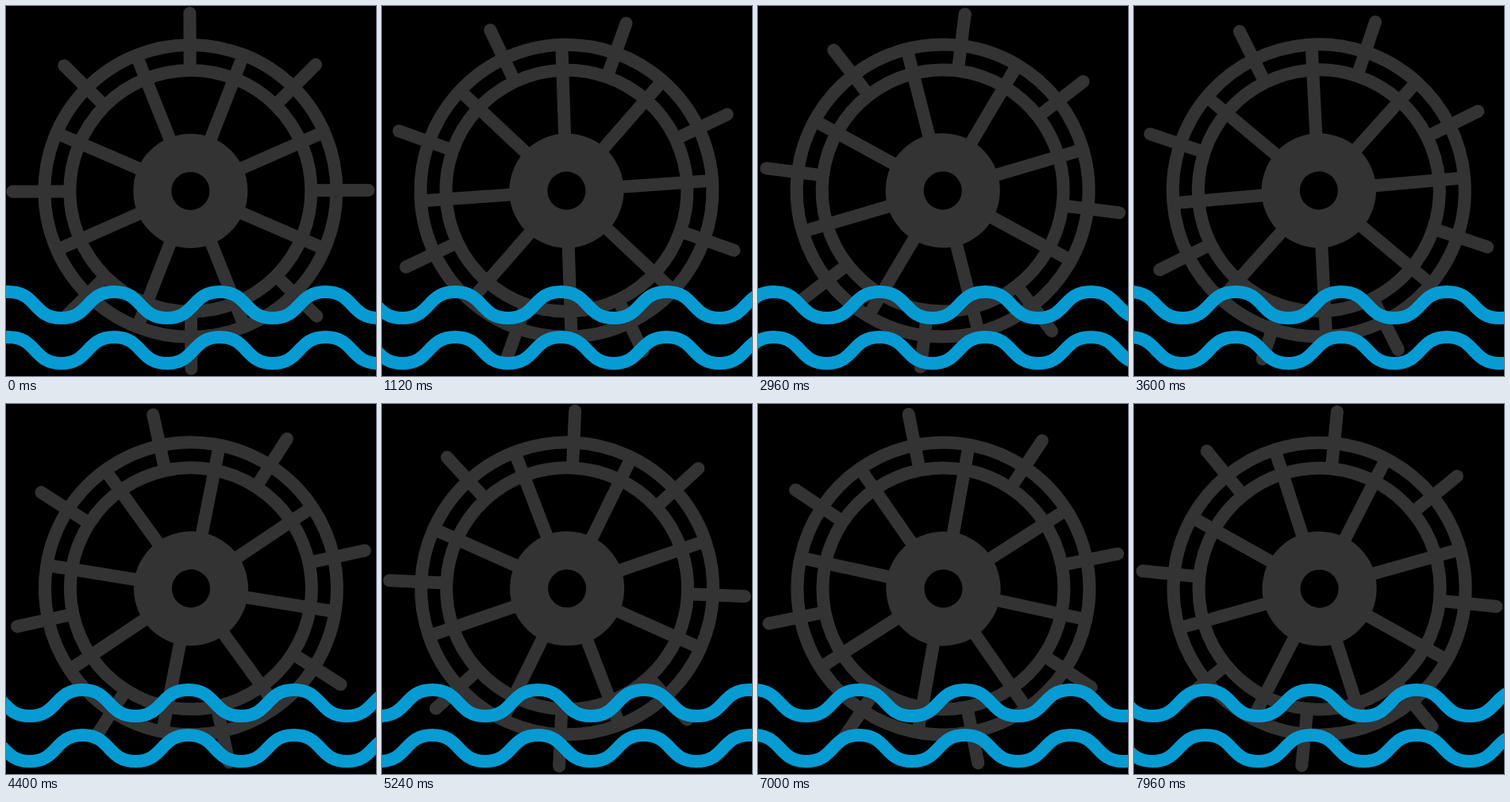
An HTML page for the animation above (8 s loop, 466 by 466 pixels).

```html
<!DOCTYPE html>
<html lang="en">
<head>
<meta charset="utf-8">
<title>Ship's wheel on the waves</title>
<style>
  html, body { margin: 0; width: 100%; height: 100%; overflow: hidden; background: #000; }
  svg { display: block; width: 100%; height: 100%; }
</style>
</head>
<body>
<svg viewBox="0 0 466 466" fill="none" stroke-width="16">
  <g id="wheel" stroke="#333">
    <circle r="184"/>
    <circle r="152"/>
    <circle r="48" stroke-width="48"/>
    <path id="spokes"/>
    <path id="handles"/>
    <g id="caps" fill="#333" stroke="none"></g>
  </g>
  <g id="waves" stroke="#069bd3">
    <path id="upper"/>
    <path id="lower"/>
  </g>
</svg>
<script>
  const LOOP = 8000;          // ms shown before the cut
  const TURN = 20330;         // ms for one full turn of the wheel
  const START_ANGLE = -0.25;
  const WAVELENGTH = 466 / 3.5;
  const WAVES_PER_TURN = 6;
  const CREST_X = 136.3;      // a crest at time 0
  const WAVE_HEIGHT = 33;
  const HANDLE = 36;          // length of the curve handles at crest and trough

  const byId = id => document.getElementById(id);
  const wheel = byId('wheel');
  const waves = byId('waves');

  function polar(r, deg) {
    const a = deg * Math.PI / 180;
    return [r * Math.sin(a), -r * Math.cos(a)].map(v => v.toFixed(2));
  }

  function rays(from, to, angles) {
    return angles.map(deg => `M${polar(from, deg)}L${polar(to, deg)}`).join('');
  }

  function wavePath(y) {
    const half = WAVELENGTH / 2;
    let x = CREST_X - 2 * WAVELENGTH;
    let d = `M${x} ${y}`;
    for (let i = 0; i < 14; i++) {
      const y0 = i % 2 ? y + WAVE_HEIGHT : y;
      const y1 = i % 2 ? y : y + WAVE_HEIGHT;
      d += `C${x + HANDLE} ${y0} ${x + half - HANDLE} ${y1} ${x + half} ${y1}`;
      x += half;
    }
    return d;
  }

  const handleAngles = Array.from({ length: 8 }, (_, i) => i * 45);
  // Spokes mirror left to right and top to bottom.
  const spokeAngles = [21.5, 66.4].flatMap(a => [a, -a, 180 - a, 180 + a]);

  byId('spokes').setAttribute('d', rays(60, 184, spokeAngles));
  byId('handles').setAttribute('d', rays(152, 224, handleAngles));
  for (const deg of handleAngles) {
    const cap = document.createElementNS('http://www.w3.org/2000/svg', 'circle');
    const [x, y] = polar(224, deg);
    cap.setAttribute('cx', x);
    cap.setAttribute('cy', y);
    cap.setAttribute('r', 8);
    byId('caps').append(cap);
  }
  byId('upper').setAttribute('d', wavePath(360));
  byId('lower').setAttribute('d', wavePath(417));

  function draw(ms) {
    const turn = ms / TURN;
    const angle = START_ANGLE + turn * 360;
    const shift = (turn * WAVES_PER_TURN % 1) * WAVELENGTH;
    // The hub sits slightly off the pivot.
    wheel.setAttribute('transform', `translate(233 233) rotate(${angle}) translate(-0.65 -0.1)`);
    waves.setAttribute('transform', `translate(${-shift} 0)`);
  }

  const start = performance.now();
  function tick() {
    draw((performance.now() - start) % LOOP);
    requestAnimationFrame(tick);
  }
  tick();
</script>
</body>
</html>
```
